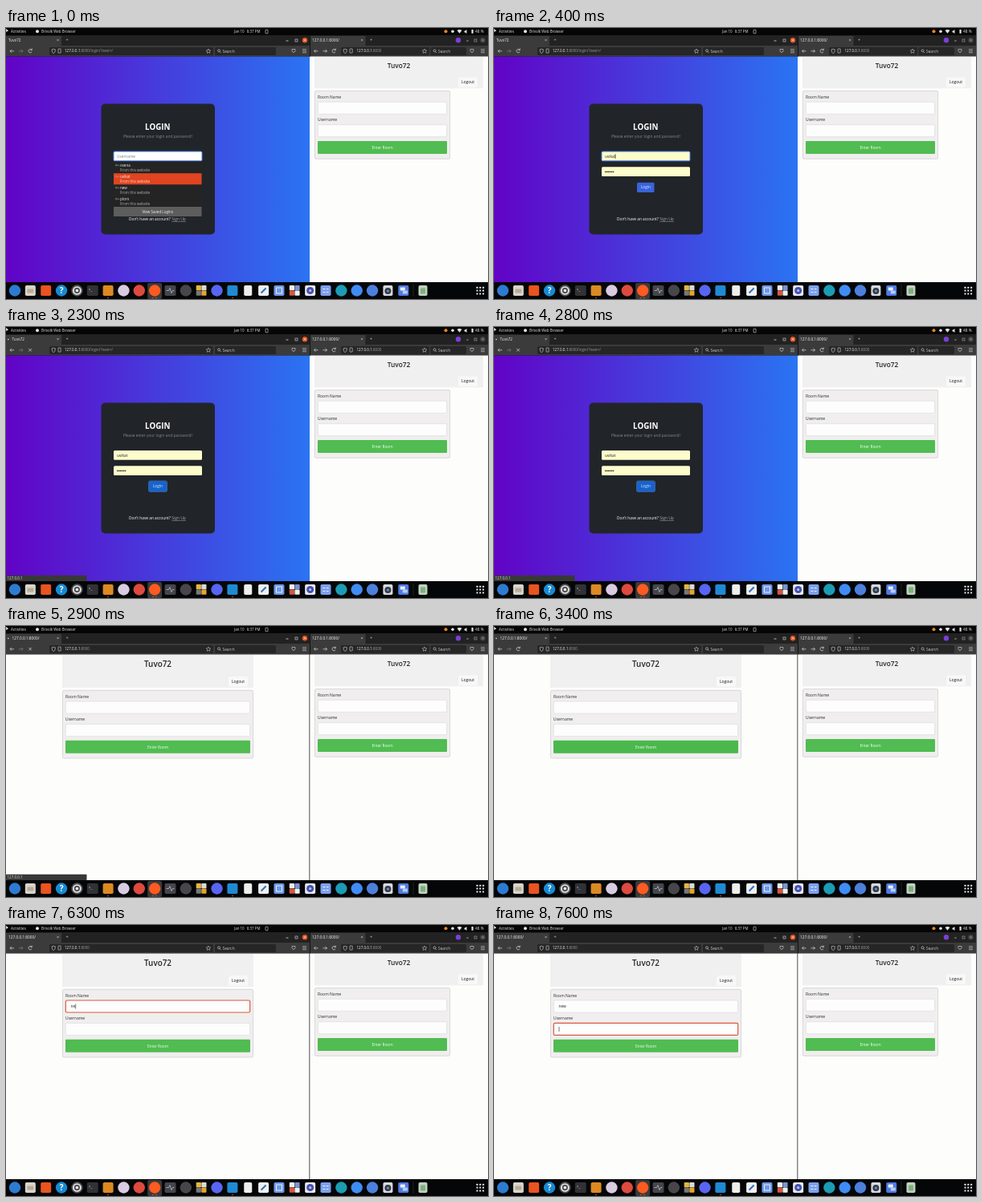
Animation, 600 px wide and 338 px high, one loop 8000 ms. Source, as an HTML page:

```html
<!DOCTYPE html>
<html lang="en">
<head>
<meta charset="utf-8">
<style>
html, body { margin: 0; height: 100%; overflow: hidden; background: #000; }
svg { display: block; width: 100vw; height: 100vh; font-family: "Open Sans", "Noto Sans", sans-serif; white-space: pre; }
</style>
</head>
<body>
<svg viewBox="0 0 600 338" xmlns="http://www.w3.org/2000/svg">
  <defs>
    <linearGradient id="sky"><stop stop-color="#6203c6"/><stop offset="1" stop-color="#2a74f2"/></linearGradient>
  </defs>
  <g id="base"></g>
  <g id="live"></g>
</svg>
<script>
const LOOP = 8000, APP = 'Tuvo72', HOST = '127.0.0.1', USER = 'uvikat';

// Moments of the story, in ms.
const PICK = 300, HOVER = 1000, SUBMIT = 1700, ARRIVE = 2900, LOADED = 3700, FOCUS = 4300, NEXT = 7600;

// Drawing helpers; text is placed by its vertical centre.
const rect = (x, y, w, h, fill, r = 0, extra = '') =>
  `<rect x="${x}" y="${y}" width="${w}" height="${h}" rx="${r}" fill="${fill}" ${extra}/>`;
const disc = (x, y, r, fill, extra = '') => `<circle cx="${x}" cy="${y}" r="${r}" fill="${fill}" ${extra}/>`;
const line = (d, stroke, w = .8) => `<path d="${d}" fill="none" stroke="${stroke}" stroke-width="${w}"/>`;
const text = (x, y, str, size, fill, extra = '') =>
  `<text x="${x}" y="${y + size * .36}" font-size="${size}" fill="${fill}" ${extra}>${str}</text>`;
const mid = 'text-anchor="middle" ';
const outline = (c, w = .6) => `stroke="${c}" stroke-width="${w}"`;
const caret = (x, y) => rect(x, y - 3, .6, 6, '#222');
const within = (t, a, b) => t >= a && t < b;

function topBar() {
  const c = '#e4e4e4';
  return rect(0, 0, 600, 9, '#060606') +
    '<path d="M0 1l3 2.6-1.5.3L.6 5.5z" fill="#fff"/>' +
    text(6, 4.3, 'Activities', 4.6, c) + disc(39, 4.2, 2, c) +
    text(44, 4.3, 'Brivolk Web Browser', 4.45, c, 'font-weight="500"') +
    text(284, 4.3, 'Jan 10', 4.45, c) + text(299.8, 4.3, '6:37 PM', 4.45, c) +
    rect(323, 2.2, 3, 4.6, 'none', .5, outline(c)) +
    disc(547.5, 4.3, 2, '#f0861c') + disc(556, 4.3, 1.8, c) +
    '<path d="M561.5 3q3-2 6 0l-3 3.7z M570.5 3.5h1.2l1.8-1.5v5l-1.8-1.5h-1.2z" fill="#e4e4e4"/>' +
    rect(579.5, 2, 2.2, 4.8, c, .4) + text(584, 4.3, '48 %', 4.8, c);
}

// Browser frame: x is the left edge, w the width, f the address field's span.
function chrome(x, w, f, search, active) {
  const c = '#dcdcdc', r = x + w, dim = active ? c : '#a8a8a8', field = '#262626';
  const [a, b, z] = active ? [350, 361.5, 372] : [574.5, 584.5, 593.5];
  return rect(x, 9, w, 13.5, '#222') + rect(x, 10, 69, 12.5, '#3b3b3b') +
    text(x + 63, 15.5, '×', 5.5, c) + text(x + 74.5, 15.5, '+', 5.5, c) +
    rect(x, 22, w, 13.5, '#3b3b3b') +
    line(`M${a - 1.5} 16h3`, dim) + rect(b - 1.5, 14, 3, 3, 'none', 0, outline(dim)) +
    disc(z, 15.3, 3.2, active ? '#e95420' : '#444') + (active ? '' : disc(563, 15.3, 3.2, '#7a3fd8')) +
    line(`M${z - 1.2} 14.1l2.4 2.4m0-2.4l-2.4 2.4`, active ? '#fff' : dim, .7) +
    line(`M${x + 10} 28.8h-5m2-2l-2 2 2 2`, c, .7) +
    line(`M${x + 16} 28.8h5m-2-2l2 2-2 2`, active ? '#808080' : c, .7) +
    rect(f[0], 24, f[1] - f[0], 10, field, 1.5) +
    line(`M${f[0] + 3} 26.8q2.2 0 2.2-1 0 1 2.2 1 0 4-2.2 5-2.2-1-2.2-5z`, c, .6) +
    rect(f[0] + 11, 26, 3.2, 5, 'none', .4, outline(c)) +
    line(`M${f[1] - 6} 26l.8 1.8 2 .2-1.5 1.3.5 2-1.8-1-1.8 1 .5-2-1.500-1.3 2-.2z`, c, .5) +
    rect(search[0], 24, search[1] - search[0], 10, field, 1.5) +
    disc(search[0] + 5, 28.3, 1.5, 'none', outline(c)) +
    line(`M${search[0] + 6} 29.4l1.5 1.5`, c, .7) + text(search[0] + 9.5, 28.8, 'Search', 4.8, '#c8c8c8') +
    line(`M${r - 22} 26.5h4v2q-2 4-4 0zM${r - 9} 26.7h5m-5 2h5m-5 2h5`, c, .6);
}

const reload = x => line(`M${x + 2} 27.3a2.2 2.2 0 1 0 .2 2.3m.1-4v2h-2`, '#dcdcdc', .7);

function dock() {
  const y = 327.5;
  const sq = (x, c, w = 13) => rect(x - w / 2, y - 6.5, w, 13, c, 1.8);
  const ci = (x, c) => disc(x, y, 7.2, c);
  const tiles = (x, cols) => cols.map((c, i) => rect(x - 6.5 + i % 2 * 6.6, y - 6.5 + (i >> 1) * 6.6, 6.2, 6.2, c, .8)).join('');
  const icons = [
    x => ci(x, '#2d7bd0'),
    x => sq(x, '#d9d5cb') + rect(x - 4, y - 2, 8, 5, '#b9ad98', .8),
    x => sq(x, '#e95420'),
    x => ci(x, '#188ad2') + text(x, y, '?', 10, '#fff', mid + 'font-weight="700"'),
    x => ci(x, '#515154') + disc(x, y, 4.5, 'none', outline('#eee', 1.7)) + disc(x, y, 1.7, '#eee'),
    x => sq(x, '#323236', 14) + text(x - 5, y - 1.5, '&gt;_', 4.5, '#ddd'),
    x => sq(x, '#dc8a22'),
    x => ci(x, '#d9cbe2'),
    x => ci(x, '#dd4b3e'),
    x => rect(x - 9, 318, 18, 20, '#3a3a3c', 2) + ci(x, '#ff5a20'),
    x => sq(x, '#45454d', 14) + line(`M${x - 5} ${y}h3l1.5-3 2 6 1.5-3h2`, '#ccc', .7),
    x => ci(x, '#48464a'),
    x => tiles(x, ['#e5b63c', '#d9d9d9', '#777', '#e5a52d']),
    x => ci(x, '#5865f2'),
    x => sq(x, '#1f8ad2'),
    x => sq(x, '#eeeeec', 10),
    x => sq(x, '#f0f0f0') + line(`M${x - 3} ${y + 3}l6-6`, '#316fc4', 2),
    x => sq(x, '#6d98e6') + rect(x - 3.5, y - 3.5, 7, 7, 'none', 0, outline('#e8eefc', 1)),
    x => tiles(x, ['#eee', '#7895d4', '#d8573f', '#eee']),
    x => sq(x, '#e8e8f2') + disc(x, y, 4.5, '#4450ae') + disc(x, y, 1.6, '#b9c3f4'),
    x => sq(x, '#7da1ee') + line(`M${x - 3.5} ${y - 2}h3m1.5 0h2.5m-7 4h3m1.5 0h2.5`, '#e9f0ff', 1),
    x => ci(x, '#1c9cb4'),
    x => ci(x, '#3f8cf5'),
    x => ci(x, '#4c80dc'),
    x => sq(x, '#d6d9de', 12) + disc(x, y + .5, 4, '#343b48') + disc(x, y + .5, 1.6, '#7390b8'),
    x => sq(x, '#4e7be0') + rect(x - 4, y - 4, 6, 4, '#e8eefc') + rect(x - 1, y, 6, 4, '#b8ccf5'),
  ];
  let out = rect(0, 317, 600, 21, '#050608') + icons.map((f, i) => f(+(11 + i * 19.35).toFixed(2))).join('');
  out += line('M507 320v15', '#333', .6) + sq(519, '#bfd3bd', 11) + rect(516, y - 3, 6, 7, '#7fae80', 1);
  for (const x of [127, 183, 187, 282]) out += disc(x, 336.5, .8, '#e95420');
  for (let i = 0; i < 9; i++) out += rect(585.5 + i % 3 * 3.8, 322.8 + (i / 3 | 0) * 3.8, 2, 2, '#eee', .4);
  return out;
}

// Room form: left edge, form width, header width, downward shift, title size, field state.
function room(x, w, headW, dy, size, s = {}) {
  const cx = x + headW / 2, ix = x + 4, iw = w - 8, lx = x + headW - 19;
  const field = (y, value, focus) =>
    rect(ix + .3, y + .3, iw - .6, 15, '#fdfdfd', 1.5, focus ? outline('#d9593d', 1.2) : outline('#d8d8d8')) +
    text(ix + 6.5, y + 7.8, value || '', 4.7, '#222') + (focus && s.caret ? caret(s.caret, y + 7.8) : '');
  return rect(x, 36, headW, 39.3 + dy, '#f0f0f0') +
    text(cx, 47, APP, size, '#212529', mid + 'font-weight="600"') +
    rect(lx - 12, 61.5 + dy, 24, 12.5, '#f8f8f8', 1.5) +
    text(lx, 67.6 + dy, 'Logout', 4.9, '#111', mid + 'font-weight="500"') +
    rect(x + .4, 78.6 + dy, w - .8, 84.6, '#f0eeee', 1.5, outline('#d2d0d0', .8)) +
    text(ix, 86 + dy, 'Room Name', 5, '#2b2b2b') + field(92 + dy, s.name, s.focus === 1) +
    text(ix, 114.2 + dy, 'Username', 5, '#2b2b2b') + field(120.4 + dy, '', s.focus === 2) +
    rect(ix, 141 + dy, iw, 16, s.hover ? '#4ab84c' : '#50bc51', 1) +
    text(x + w / 2, 149.2 + dy, 'Enter Room', 4.75, '#f4fff4', mid);
}

function savedLogins() {
  const rows = ['osena', USER, 'new', 'plorn'];
  return rect(134, 166.5, 109.5, 68.5, '#242424') + rows.map((name, i) => {
    const y = 167.2 + i * 14, hot = i === 1;
    return (hot ? rect(134, y, 109.5, 14, '#e04420') : '') +
      disc(137.3, y + 4, 1, 'none', outline('#aaa', .5)) + line(`M138.3 ${y + 4}h2.5v1`, '#aaa', .5) +
      text(142, y + 4, name, 4.5, '#f4f4f4') +
      text(142, y + 10.3, 'From this website', 4.5, hot ? '#ffd9cc' : '#b2b2b2');
  }).join('') + rect(134, 223, 109.5, 12, '#5d5d5d') +
    text(188.8, 229, 'View Saved Logins', 4.55, '#f2f2f2', mid);
}

// Picked credentials and the login button.
function credentials(t) {
  const sent = t >= SUBMIT;
  let out = rect(134, 173.3, 110, 11.7, '#fdfccb', 1.5);
  for (let i = 0; i < 6; i++) out += disc(138.8 + i * 1.95, 179.4, .8, '#222');
  if (!sent && !within(t, 800, 1600)) out += caret(150.7, 160);
  out += sent
    ? rect(177.5, 192, 23, 13.5, '#1763cc', 1.8, outline('#3b5f9c', 1))
    : rect(178, 192.7, 21.5, 12.3, t < HOVER ? '#3a63dc' : '#2f5ccf', 1.5);
  return out + text(188.9, 198.8, 'Login', 4.7, '#e8eefc', mid);
}

function login(t) {
  const open = t < PICK;
  const ring = t < SUBMIT ? outline('#4a7ee8', 1) : '';
  return rect(0, 35.5, 378, 281.5, 'url(#sky)') + rect(118.5, 94.5, 141.5, 163, '#212529', 5) +
    text(188.8, 123.5, 'LOGIN', 9.8, '#fff', mid + 'font-weight="700"') +
    text(188.8, 135.3, 'Please enter your login and password!', 4.84, '#85888c', mid) +
    rect(134, 154, 110, 11.8, open ? '#fff' : '#fdfccb', 1.5, ring) +
    text(138, 160.2, open ? 'Username' : USER, 4.75, open ? '#7a7f85' : '#222') +
    text(153, 238.7, "Don't have an account?", 4.8, '#fff') +
    text(206.3, 238.7, 'Sign Up', 4.95, '#a3a8ae', 'text-decoration="underline"') +
    (open ? savedLogins() : credentials(t));
}

function leftRoom(t) {
  const focus = t < FOCUS ? 0 : t < NEXT ? 1 : 2;
  const name = t < 6300 ? '' : t < 6500 ? 'ne' : 'new';
  const off = within(t, 5500, 6300) || within(t, 6700, 7400);
  const at = focus === 2 || !name ? 80.7 : name === 'ne' ? 86.5 : 90;
  return rect(0, 35.5, 377.5, 281.5, '#fdfdfc') + rect(377.5, 35.5, 1, 281.5, '#8c8c8c') +
    room(70, 238, 238, 1.7, 9.9, { focus, name, caret: !off && at, hover: within(t, 3400, 4000) });
}

function scene(t) {
  const inRoom = t >= ARRIVE;
  let out = inRoom ? leftRoom(t) : login(t);
  out += text(within(t, SUBMIT, FOCUS) ? 7.5 : 3, 15.5, inRoom ? HOST + ':8000/' : APP, inRoom ? 4.75 : 4.6, '#f4f4f4');
  if (within(t, SUBMIT, LOADED))
    out += disc((4.2 + 1.6 * Math.sin(t * Math.PI / 300)).toFixed(2), 15.5, .8, '#e8e8e8');
  out += within(t, SUBMIT, 3400)
    ? line('M28.3 26.9l3.6 3.6m0-3.6l-3.6 3.6', '#dcdcdc', .7)
    : reload(30);
  out += text(73, 28.8, `${HOST}<tspan fill="#9a9a9a">:8000${inRoom ? '' : '/login/?next=/'}</tspan>`, 4.55, '#f4f4f4');
  if (within(t, SUBMIT, 3300))
    out += rect(0, 309.7, 100.5, 7.3, '#383838', .8) + text(1.5, 313.3, HOST, 4.5, '#e6e6e6');
  return out;
}

const base = document.getElementById('base'), live = document.getElementById('live');
base.innerHTML = rect(378, 35, 222, 282, '#fdfdfc') + topBar() +
  chrome(0, 378, [54, 258], [260, 336], true) + chrome(378.5, 221.5, [417, 527], [528.5, 573], false) +
  rect(378, 9, .6, 27, '#0c0c0c') +
  text(381, 15.5, HOST + ':8000/', 4.75, '#f4f4f4') + reload(408) +
  text(436.5, 28.8, `${HOST}<tspan fill="#9a9a9a">:8000</tspan>`, 4.55, '#f4f4f4') +
  room(384, 169, 210, 0, 8.3) + dock();

let shown = -1;
function frame() {
  const t = Math.floor(performance.now() % LOOP / 100) * 100;
  if (t !== shown) live.innerHTML = scene(shown = t);
  requestAnimationFrame(frame);
}
frame();
</script>
</body>
</html>
```
